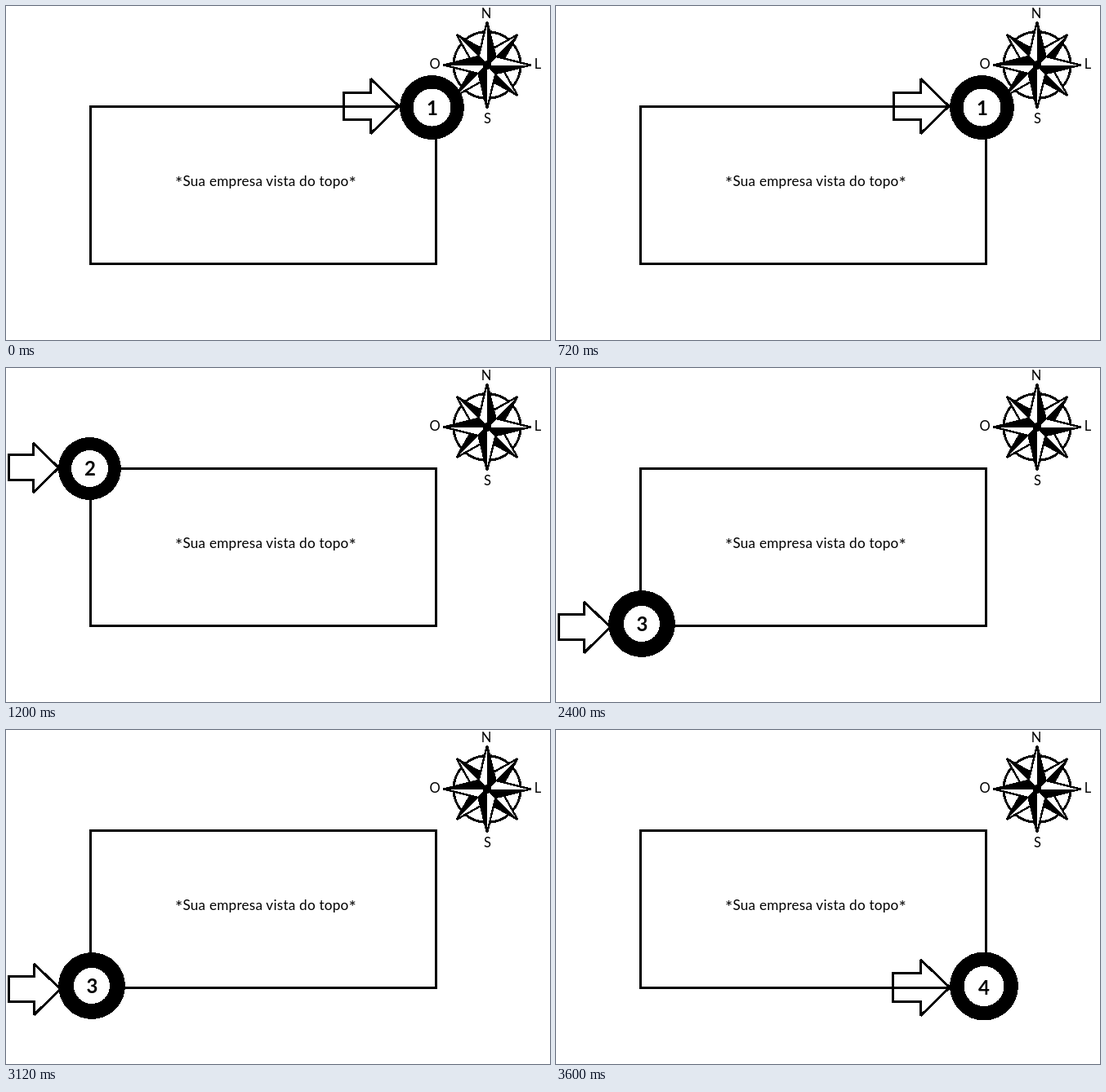
Write an HTML page that moves like this. It is 666x410 px and loops after 4.8 s.

```html
<!DOCTYPE html>
<html lang="pt">
<head>
<meta charset="utf-8">
<title>Sua empresa vista do topo</title>
<style>
  html, body { margin: 0; width: 100%; height: 100%; overflow: hidden; background: #fff; }
  svg { display: block; width: 666px; height: 410px; }
  text { font-family: Lato, "Open Sans", sans-serif; font-size: 16.5px; text-anchor: middle; }
  .label { font-size: 17.2px; letter-spacing: .2px; }
  .star { font-size: 22px; }
  .num { font-size: 24px; font-weight: 700; }
  .line { fill: none; stroke: #000; stroke-width: 3; stroke-miterlimit: 2; }
  path, circle, rect { shape-rendering: crispEdges; }
</style>
</head>
<body>
<svg viewBox="0 0 666 410">
  <rect class="line" x="103.5" y="123.5" width="423" height="193"/>
  <text class="label" x="318" y="221"><tspan class="star" dy="4">*</tspan><tspan dy="-4">Sua empresa vista do topo</tspan><tspan class="star" dy="4">*</tspan></text>
  <g id="rose" transform="translate(589 72.5)">
    <circle class="line" r="41"/>
  </g>
  <text x="588" y="15">N</text>
  <text x="525" y="77">O</text>
  <text x="651" y="77">L</text>
  <text x="589.5" y="143.5">S</text>
  <g id="stops"></g>
</svg>
<script>
const STEP = 1200;
const NS = "http://www.w3.org/2000/svg";

function add(parent, tag, attrs, text) {
  const el = document.createElementNS(NS, tag);
  for (const k in attrs) el.setAttribute(k, attrs[k]);
  if (text) el.textContent = text;
  return parent.appendChild(el);
}

// Compass arms: a white kite with one half filled black.
const rose = document.getElementById("rose");
function arm(angle, length, waist) {
  const g = add(rose, "g", { transform: `rotate(${angle})` });
  add(g, "path", {
    d: `M0 0L${-waist} ${-waist}L0 ${-length}L${waist} ${-waist}Z`,
    fill: "#fff", stroke: "#000", "stroke-width": 2.4, "stroke-miterlimit": 3
  });
  add(g, "path", { d: `M0 0L0 ${-length}L${waist} ${-waist}Z` });
}
for (const a of [45, 135, 225, 315]) arm(a, 53, 11.5);
for (const a of [0, 90, 180, 270]) arm(a, 53.5, 10.5);
add(rose, "circle", { r: 5.5 });

// Ring: centre and radii; num: digit position;
// arrow: tail x, neck x, tip x, tip y, body top and bottom, head top and bottom.
const stops = [
  { ring: [521.5, 124.5, 39.5, 23], num: [522, 134], arrow: [413.5, 446.5, 481, 123, 106.5, 139.5, 89.5, 156.5] },
  { ring: [102.5, 123.5, 38.5, 22.5], num: [103, 132], arrow: [3.5, 33.5, 64.5, 122.5, 106.5, 137.5, 92, 153] },
  { ring: [105, 314, 41, 22], num: [105.5, 323], arrow: [3.5, 34.5, 66.5, 318, 302, 333.5, 287, 349.5] },
  { ring: [524, 314.5, 42, 24.5], num: [524, 325], arrow: [412.5, 446.5, 482, 316, 298.5, 333.5, 282, 350.5] }
];

const layer = document.getElementById("stops");
const groups = stops.map(({ ring, num, arrow }, i) => {
  const g = add(layer, "g", {});
  const [cx, cy, outer, inner] = ring;
  const [tail, neck, tip, mid, top, bottom, high, low] = arrow;
  add(g, "path", {
    class: "line",
    d: `M${tail} ${top}H${neck}V${high}L${tip} ${mid}L${neck} ${low}V${bottom}H${tail}Z`
  });
  add(g, "circle", { cx, cy, r: outer });
  add(g, "circle", { cx, cy, r: inner, fill: "#fff" });
  add(g, "text", { class: "num", x: num[0], y: num[1] }, String(i + 1));
  return g;
});

const start = performance.now();
function draw(now) {
  const current = Math.floor(Math.max(0, now - start) / STEP) % groups.length;
  groups.forEach((g, i) => g.setAttribute("visibility", i === current ? "visible" : "hidden"));
  requestAnimationFrame(draw);
}
draw(start);
</script>
</body>
</html>
```
